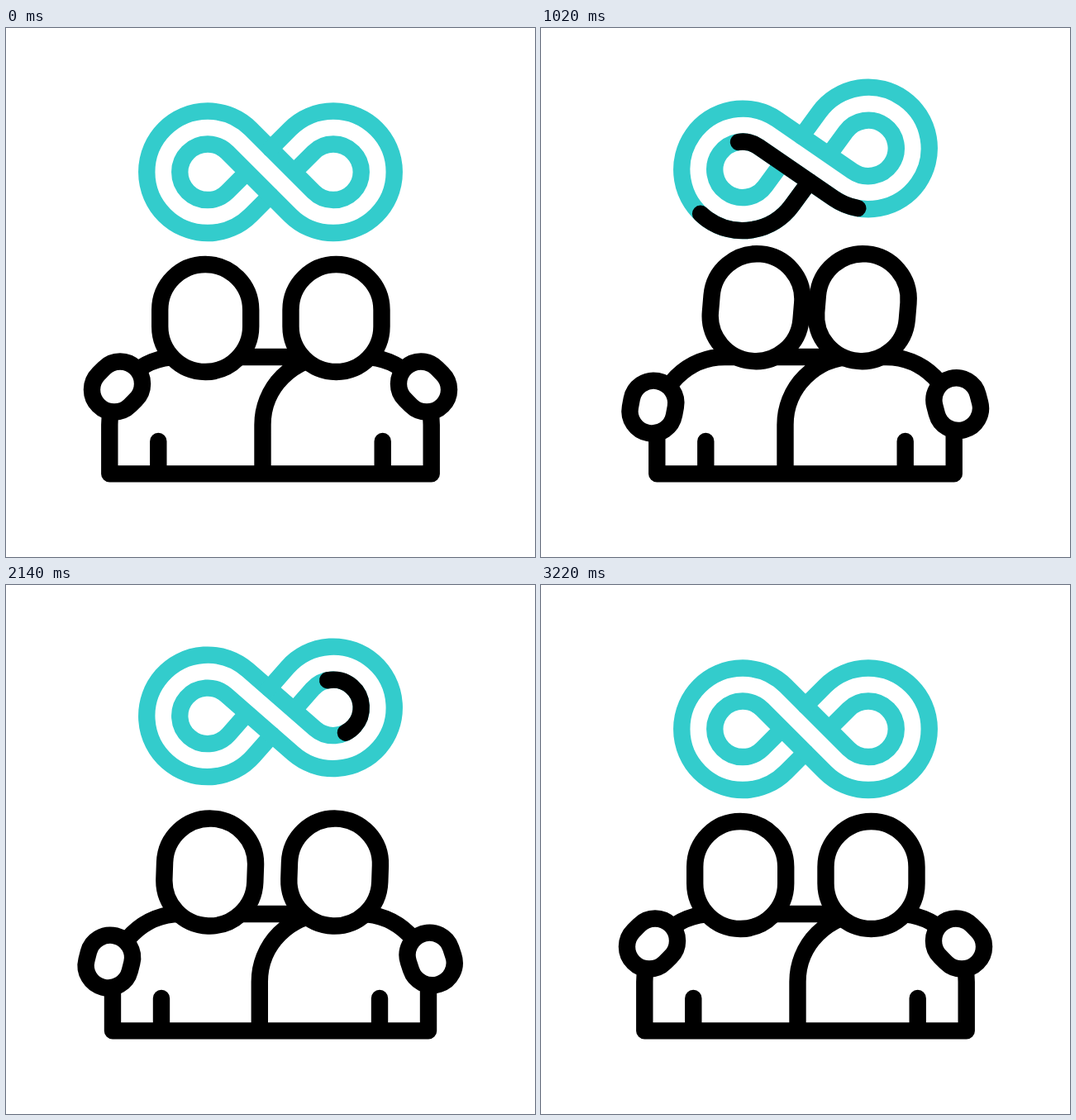
Animation, 640 px wide and 640 px high, one loop 3.6 s. Source, as an HTML page:

```html
<!DOCTYPE html>
<html lang="en">
<head>
<meta charset="utf-8">
<title>Friends forever</title>
<style>
  html, body { margin: 0; width: 100%; height: 100%; overflow: hidden; background: #fff; }
  svg { display: block; width: 100%; height: 100%; }
  path { fill: none; }
  rect { fill: #fff; }
  path, rect { stroke: #000; stroke-width: 20.4; stroke-linecap: round; stroke-linejoin: round; }
  .teal { stroke: #3cc; }
</style>
</head>
<body>
<svg viewBox="0 0 640 640">
  <path class="teal"/>
  <path class="teal"/>
  <path class="trace" pathLength="1"/>
  <path class="trace" pathLength="1"/>
  <path id="bodies"/>
  <rect class="head" x="186.2" y="286" width="110" height="130" rx="55"/>
  <rect class="head" x="344.5" y="286" width="110" height="130" rx="55"/>
  <rect class="hand" x="107.5" y="402" width="54" height="64" rx="27"/>
  <g transform="matrix(-1 0 0 1 640 0)">
    <rect class="hand" x="107.5" y="402" width="54" height="64" rx="27"/>
  </g>
</svg>
<script>
const LOOP = 3600, SWING = 805, OUTER = 73.75, INNER = 33.75;
const all = q => [...document.querySelectorAll(q)];
const bands = all('.teal'), traces = all('.trace'), heads = all('.head'), hands = all('.hand');
const bodies = document.getElementById('bodies');

// Keys are [time, value] pairs
const leftLobe = [[0, 0], [420, -31], [520, -36], [1020, -3], [1280, 12], [1660, -12],
  [1920, -27], [2140, -16], [2460, 6], [2620, 8], [3220, 0]];
const rightLobe = [[0, 0], [420, -48], [580, -68], [1020, -29], [1080, -19], [1380, 14],
  [1660, 7], [2060, -29], [2140, -26], [2460, 3], [2660, 8], [3220, 0]];
const squeeze = [[0, 0], [420, 7.8], [805, 15], [1630, 15], [2140, 3.7], [2460, .7], [2800, 0]];
const headDrop = [[0, 0], [420, 16], [1020, -13], [1640, 6], [2140, -3.5], [2440, 0]];
const headTilt = [[0, 0], [420, -6], [1020, 4.8], [1640, -5], [2140, 2], [2440, 0]];
const trims = [
  { tail: [[1020, 0], [1660, .43], [2140, .775], [2460, .908], [2700, 1]],
    tip: [[770, 0], [1020, .235], [1160, .36], [1660, .717], [2140, .918], [2430, 1]] },
  { tail: [[340, 0], [420, .013], [1020, .51], [1660, .84], [1960, 1]],
    tip: [[60, 0], [420, .353], [1020, .755], [1440, .92], [1680, 1]] }
];

// Smooth interpolation that never overshoots its keys
function track(keys, t) {
  const last = keys.length - 1;
  if (t <= keys[0][0]) return keys[0][1];
  if (t >= keys[last][0]) return keys[last][1];
  const i = keys.findIndex(k => k[0] > t) - 1;
  const rise = j => (keys[j + 1][1] - keys[j][1]) / (keys[j + 1][0] - keys[j][0]);
  const slope = j => {
    if (j === 0 || j === last) return 0;
    const a = rise(j - 1), b = rise(j);
    return a * b > 0 ? 2 * a * b / (a + b) : 0;
  };
  const [t0, v0] = keys[i], [t1, v1] = keys[i + 1];
  const span = t1 - t0, u = (t - t0) / span, w = 1 - u;
  return v0 * (1 + 2 * u) * w * w + v1 * u * u * (3 - 2 * u)
    + span * u * w * (slope(i) * w - slope(i + 1) * u);
}

// One edge of the ribbon: around the outside of lobe a, then the inside of lobe b
function strand(a, b) {
  const dx = b.x - a.x, dy = b.y - a.y, quarter = Math.PI / 2;
  const axis = Math.atan2(dy, dx);
  const lean = Math.asin((OUTER + INNER) / Math.hypot(dx, dy));
  const at = (c, r, angle) =>
    (c.x + r * Math.cos(angle)).toFixed(2) + ' ' + (c.y + r * Math.sin(angle)).toFixed(2);
  const mid = { x: (a.x + b.x) / 2, y: (a.y + b.y) / 2 };
  const gap = (OUTER - INNER) / 2 / Math.cos(lean);
  return `M${at(mid, gap, axis + quarter)}
    L${at(a, OUTER, axis - lean + quarter)}
    A${OUTER} ${OUTER} 0 1 1 ${at(a, OUTER, axis + lean - quarter)}
    L${at(b, INNER, axis + lean + quarter)}
    A${INNER} ${INNER} 0 1 0 ${at(b, INNER, axis - lean - quarter)}
    L${at(a, OUTER / Math.sin(lean), axis)}`;
}

function drawInfinity(t) {
  const left = { x: 244, y: 174.3 + track(leftLobe, t) };
  const right = { x: 396, y: 174.3 + track(rightLobe, t) };
  [strand(left, right), strand(right, left)].forEach((d, i) => {
    const tail = track(trims[i].tail, t), size = track(trims[i].tip, t) - tail;
    bands[i].setAttribute('d', d);
    traces[i].setAttribute('d', d);
    traces[i].style.display = size > .002 ? '' : 'none';
    traces[i].style.strokeDasharray = `${size} 2`;
    traces[i].style.strokeDashoffset = -tail;
  });
}

function drawFriends(t) {
  const d = track(squeeze, t), l = 125.3 + d, r = 514.7 - d, m = 310.5 - d, base = 539.4;
  bodies.setAttribute('d', `M${l} ${base}V480A82 82 0 0 1 ${l + 82} 398H${r - 82}
    A82 82 0 0 1 ${r} 480V${base}Z
    M${m} ${base}V480A82 82 0 0 1 ${m + 82} 398
    M${l + 59} ${base}V500M${r - 59} ${base}V500`);

  const drop = track(headDrop, t), tilt = track(headTilt, t);
  heads.forEach((head, i) => head.setAttribute('transform',
    `translate(${i ? -d : d} ${drop}) rotate(${tilt} ${i ? 399.5 : 241.2} 403)`));

  const u = t < 4 * SWING ? 1 - Math.abs(t / SWING % 2 - 1) : 0;
  const swing = u * u * (3 - 2 * u);
  hands.forEach((hand, i) => hand.setAttribute('transform',
    `translate(${d}) rotate(${-swing * (i ? 36.7 : 42)} 167 469) rotate(45 134.5 434)`));
}

function frame() {
  const t = performance.now() % LOOP;
  drawInfinity(t);
  drawFriends(t);
  requestAnimationFrame(frame);
}
frame();
</script>
</body>
</html>
```
